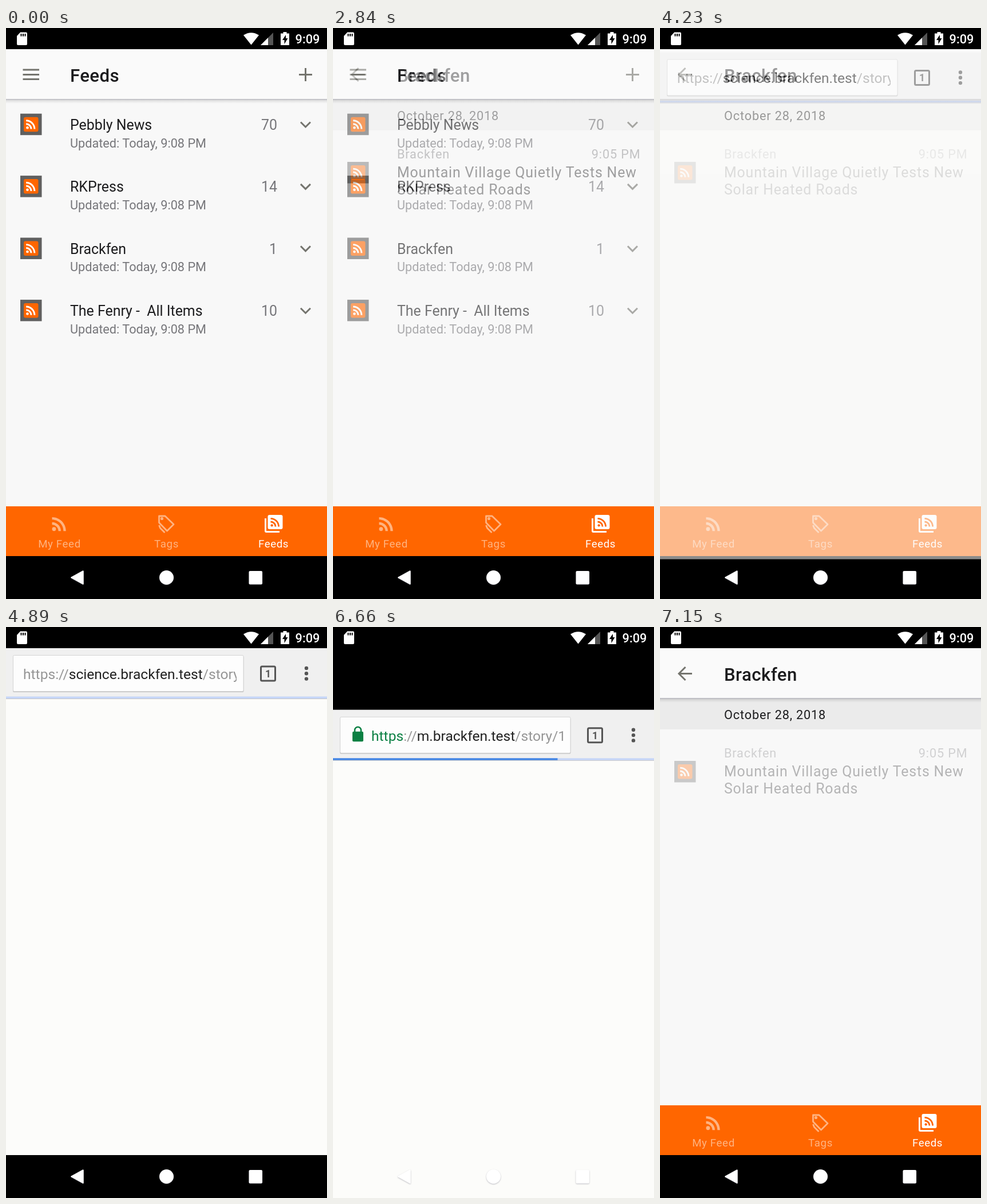
Animation of 561x998 px, one loop 8 s. Source, as an HTML page:

```html
<!DOCTYPE html>
<html lang="en">
<head>
<meta charset="utf-8">
<title>Feed reader</title>
<style>
  html, body { margin: 0; width: 100%; height: 100%; overflow: hidden; background: #000; }
  svg { display: block; width: 100vw; height: 100vh; font-family: Roboto, sans-serif; }
  text { white-space: pre; }
  .title { font-size: 31.2px; font-weight: 500; letter-spacing: .4px; fill: #1c1c1e; }
  .body { font-size: 24.9px; fill: #1c1c1e; }
  .small { font-size: 21.7px; fill: #1c1c1e; }
  .tab { font-size: 18.7px; letter-spacing: .62px; fill: #fff; text-anchor: middle; }
  .url { font-size: 24.6px; fill: #222; }
  .wide { letter-spacing: .84px; }
  .end { text-anchor: end; }
  .grey { fill: #76767a; }
  .pale { fill: #969696; }
  .green { fill: #0b8043; }
  .line { fill: none; stroke: #74746e; stroke-width: 3; }
</style>
</head>
<body>
<svg viewBox="0 0 561 998" preserveAspectRatio="none">
  <defs>
    <symbol id="rss" viewBox="0 0 24 24">
      <g fill="currentColor">
        <circle cx="6.18" cy="17.82" r="2.18"/>
        <path d="M4 4.44v2.83c7.03 0 12.73 5.7 12.73 12.73h2.83C19.56 11.41 12.59 4.44 4 4.44zm0 5.66v2.83c3.9 0 7.07 3.17 7.07 7.07h2.83c0-5.47-4.43-9.9-9.9-9.9z"/>
      </g>
    </symbol>
    <g id="badge">
      <rect width="37.5" height="37.5" fill="#606060"/>
      <rect x="6" y="6" width="25.5" height="25.5" rx="3" fill="#f60"/>
      <use href="#rss" x="6" y="6" width="25" height="25" color="#fff"/>
    </g>
    <linearGradient id="fall" x2="0" y2="1">
      <stop stop-color="#55556a" stop-opacity=".42"/>
      <stop offset=".35" stop-color="#555" stop-opacity=".14"/>
      <stop offset="1" stop-color="#555" stop-opacity="0"/>
    </linearGradient>
    <g id="appBar">
      <rect y="37" width="561" height="88" fill="#fafafa"/>
      <rect y="124" width="561" height="8" fill="url(#fall)"/>
    </g>
    <clipPath id="urlClip"><rect x="20" y="50" width="383" height="63"/></clipPath>
  </defs>

  <rect width="561" height="998"/>

  <g id="app">
    <rect y="37" width="561" height="886" fill="#f8f8f8"/>
    <g id="feeds">
      <use href="#appBar"/>
      <path class="line" d="M29.5 73H58M29.5 81.5H58M29.5 89.5H58M512 81.5h23M523.5 70v23"/>
      <text class="title" x="112" y="94">Feeds</text>
      <g id="rows"></g>
    </g>

    <g id="detail">
      <rect y="37" width="561" height="799" fill="#f8f8f8"/>
      <rect y="125" width="561" height="54" fill="#ebebeb"/>
      <use href="#appBar"/>
      <path class="line" d="M56 81.5H34M44.5 70 33 81.5 44.5 93"/>
      <text class="title" x="112" y="94">Brackfen</text>
      <text class="small wide" x="112" y="161">October 28, 2018</text>
      <circle id="ripple" cx="278" cy="272" r="23" fill="#000" opacity=".045"/>
      <g id="article">
        <use href="#badge" x="25" y="234"/>
        <text class="small wide grey" x="112" y="228">Brackfen</text>
        <text class="small wide grey end" x="537.5" y="228">9:05 PM</text>
        <text class="body wide" x="112" y="261">Mountain Village Quietly Tests New</text>
        <text class="body wide" x="112" y="290.5">Solar Heated Roads</text>
      </g>
    </g>

    <rect y="836" width="561" height="87" fill="#f60"/>
    <g opacity=".5">
      <use href="#rss" x="74.3" y="848" width="37.4" height="37.4" color="#fff"/>
      <text class="tab" x="93.5" y="907.5">My Feed</text>
      <g fill="none" stroke="#fff" stroke-width="2.8" stroke-linejoin="round">
        <path d="M267.5 853H278l15 14.5-11.5 11.5-14-14.5z"/>
        <path d="M267.5 869l2 5 8 8"/>
        <circle cx="272.5" cy="857.5" r="1.2"/>
      </g>
      <text class="tab" x="280.5" y="907.5">Tags</text>
    </g>
    <rect x="457.5" y="851" width="26" height="25" rx="3" fill="#fff"/>
    <path d="M453.5 857v22q0 1.500 1.5 1.500h23" fill="none" stroke="#fff" stroke-width="3"/>
    <use href="#rss" x="458.5" y="851.5" width="24" height="24" color="#f60"/>
    <text class="tab" x="467.5" y="907.5">Feeds</text>
  </g>

  <g id="browser">
    <rect y="37" width="561" height="886" fill="#fcfcfa"/>
    <rect y="37" width="561" height="88" fill="#f0f0f0"/>
    <rect x="12" y="51" width="403.5" height="63" rx="2" fill="#c4c4c4"/>
    <rect x="12.5" y="49.5" width="402.5" height="63" rx="2" fill="#fdfdfd" stroke="#d4d4d4"/>
    <g clip-path="url(#urlClip)">
      <text id="firstUrl" class="url" x="30" y="91"><tspan class="pale">https://</tspan>science.brackfen.test<tspan class="pale">/story</tspan></text>
      <g id="secureUrl">
        <rect class="green" x="34" y="75" width="19" height="17.5" rx="2"/>
        <path d="M38 76v-3.500a5.500 5.500 0 0 1 11 0V76" fill="none" stroke="#0b8043" stroke-width="2.6"/>
        <text class="url" x="67" y="91"><tspan class="green">https</tspan><tspan class="pale">://</tspan>m.brackfen.test<tspan class="pale">/story/1</tspan></text>
      </g>
    </g>
    <rect x="445.5" y="69" width="25" height="25" rx="2" fill="none" stroke="#555" stroke-width="3"/>
    <text x="458" y="88" font-size="17.5" font-weight="700" fill="#555" text-anchor="middle">1</text>
    <g fill="#555">
      <circle cx="525" cy="72" r="3.2"/>
      <circle cx="525" cy="81.3" r="3.2"/>
      <circle cx="525" cy="90.6" r="3.2"/>
    </g>
    <rect y="121.5" width="561" height="3.5" fill="#c6d6f8"/>
    <rect id="progress" y="121.5" height="3.5" fill="#4285e4"/>
    <rect y="125" width="561" height="1" fill="#c4c4c8"/>
  </g>

  <rect width="561" height="37"/>
  <g fill="#fff">
    <path d="M25 7.500h10q2 0 2 2V28q0 2-2 2H21q-2 0-2-2V14z"/>
    <path d="M26.500 10v4.500M30 10v4.500M33.500 10v4.500" stroke="#000" stroke-width="2"/>
    <path d="M428.500 29.500 415 12.500Q428.500 4 442 12.500z"/>
    <path d="M467 8v22h-22z" fill="#555"/>
    <path d="M458 17v13h-13z"/>
    <path d="M484.500 9.500V7h6v2.500h4.500V30h-15V9.500z"/>
    <path d="M489 12v6h3.500L486.500 28v-7H483z" fill="#000"/>
    <text x="505.5" y="27" font-size="21.8" font-weight="500">9:09</text>
  </g>
  <g fill="#fff" style="filter:drop-shadow(0 1px 1px rgba(70,70,90,.35))">
    <path d="M114.500 960.500 134.500 949.500v22z" stroke="#fff" stroke-width="2.5" stroke-linejoin="round"/>
    <circle cx="280.5" cy="960.5" r="12.5"/>
    <rect x="424.5" y="949" width="23.5" height="23.5" rx="2"/>
  </g>
</svg>
<script>
const LOOP = 8000;
const $ = id => document.getElementById(id);
const ramp = (t, start, end) => Math.min(1, Math.max(0, (t - start) / (end - start)));
const show = (id, visible) => $(id).setAttribute('visibility', visible ? 'visible' : 'hidden');
const fade = (id, opacity) => $(id).setAttribute('opacity', opacity);

const feeds = [['Pebbly News', 70], ['RKPress', 14], ['Brackfen', 1], ['The Fenry -\u00a0 All Items', 10]];
$('rows').innerHTML = feeds.map(([name, unread], i) => `
  <g transform="translate(0 ${i * 108.4})">
    <use href="#badge" x="25" y="149.7"/>
    <text class="body" x="112" y="178">${name}</text>
    <text class="small grey" x="112" y="208.5">Updated: Today, 9:08 PM</text>
    <text class="body grey end" x="474" y="178">${unread}</text>
    <path class="line" d="M515 164.5l8.5 8.5 8.5-8.5"/>
  </g>`).join('');

function render(t) {
  fade('detail', ramp(t, 2760, 2960));
  show('ripple', t >= 3940 && t < 3980);
  fade('article', t < 3980 ? 1 : 0.3);

  // The browser rises while fading in, then later drops off the stage.
  const rise = 26 * (1 - ramp(t, 4150, 4350)) ** 3;
  const drop = 1098 * ramp(t, 6593, 6810) ** 2;
  show('browser', t >= 4150 && t < 6810);
  fade('browser', ramp(t, 4120, 4320));
  $('browser').setAttribute('transform', `translate(0 ${rise + drop})`);
  show('firstUrl', t >= 4150 && t < 6200);
  show('secureUrl', t >= 6200 && t < 6810);
  $('progress').setAttribute('width', 392.5 * (1 - (1 - ramp(t, 6180, 6600)) ** 2));

  // The app comes back from black, growing to full size.
  const returning = t >= 6593;
  const scale = returning ? 1 - 0.1 * (1 - ramp(t, 6725, 7150)) ** 2 : 1;
  $('app').setAttribute('transform', `translate(280.5 499) scale(${scale}) translate(-280.5 -499)`);
  fade('app', returning ? ramp(t, 6725, 6885) : 1);
}

const start = performance.now();
function tick() {
  render((performance.now() - start) % LOOP);
  requestAnimationFrame(tick);
}
tick();
</script>
</body>
</html>
```
